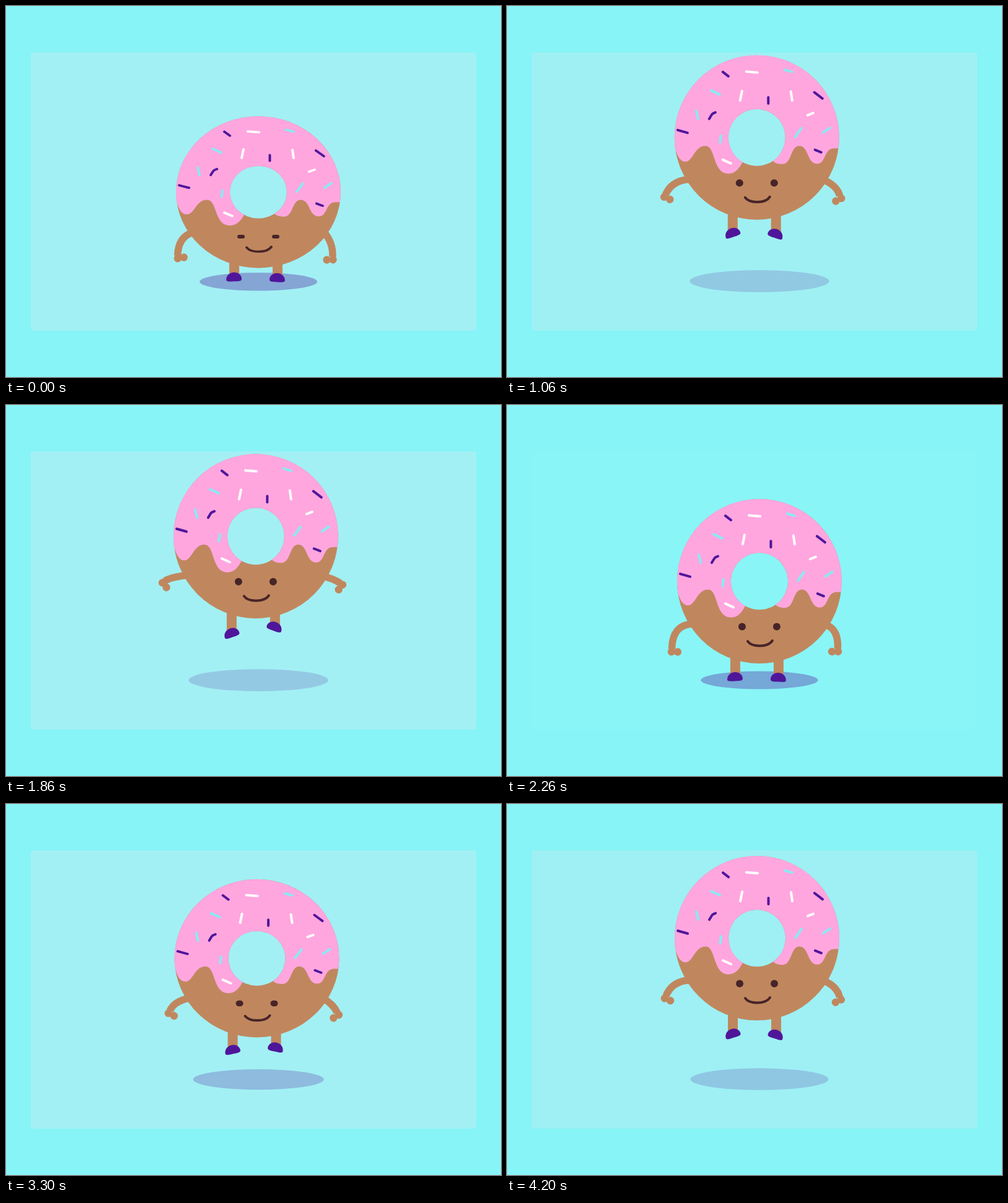
An HTML page for the animation above (4220 ms loop, 800 by 600 pixels).

```html
<!DOCTYPE html>
<html lang="en">
<head>
<meta charset="utf-8">
<title>Bouncing donut</title>
<style>
  html, body { margin: 0; width: 100%; height: 100%; overflow: hidden; background: #87f4f7; }
  svg { display: block; width: 800px; height: 600px; }
  .dough { fill: #c0875e; }
  .limb { fill: none; stroke: #c0875e; }
  .arm { stroke-width: 11.5; }
  .leg { stroke-width: 16; }
  .purple { fill: #50169a; }
  .face { fill: #472428; }
  .sprinkles { fill: none; stroke-width: 4; stroke-linecap: round; stroke-linejoin: round; }
</style>
</head>
<body>
<svg viewBox="0 0 800 600">
  <rect id="panel" x="40" y="75" width="720" height="450" rx="4" fill="#a2f0f4"/>
  <ellipse id="shadow" class="purple" cx="408"/>
  <g id="donut">
    <path id="legL" class="limb leg"/>
    <path id="legR" class="limb leg"/>
    <path id="shoeL" class="purple" d="M-12.5 4.5C-12.5-3-6-7.5.5-7.5S12.5-3 12.5 3C12.5 7 8 7 0 7C-8 7.5-12.5 7.5-12.5 4.5Z"/>
    <path id="shoeR" class="purple" d="M12.5 4.5C12.5-3 6-7.5-.5-7.5S-12.5-3-12.5 3C-12.5 7-8 7 0 7C8 7.5 12.5 7.5 12.5 4.5Z"/>
    <g id="armL" class="dough"><path class="limb arm"/><circle r="6.2"/><circle r="6.2"/></g>
    <g id="armR" class="dough"><path class="limb arm"/><circle r="6.2"/><circle r="6.2"/></g>
    <g id="body">
      <path class="dough" fill-rule="evenodd" d="M-133 0A133 133 0 1 1 133 0A133 133 0 1 1-133 0ZM-46 0A46 46 0 1 0 46 0A46 46 0 1 0-46 0Z"/>
      <path fill="#ffa6df" d="M-131.8 18C-128 32-123 39-115.5 39C-103 39-101 13.5-83 13.5C-66 13.5-72 58.5-46 58.5C-34 58.5-28 49-23 39.8A46 46 0 1 1 26 38C30 42 35 43 41 43C57 43 54 13.5 68.5 13.5C84 13.5 81 42.5 97.5 42.5C112 42.5 108 17.5 125 17.5H131.8A133 133 0 1 0-131.8 18Z"/>
      <g class="sprinkles">
        <path stroke="#50169a" d="M-55-106L-46-99M18.5-65V-55M93-73L106-63M-77-30Q-73-37-72-38T-67-40.5M-128-12L-112-7.5M94 20L104 24"/>
        <path stroke="#fff" d="M-17-106.5L1-105M-24-75L-27-60M55-74L57-60M82-36L91-39.5M-55 36L-42 42"/>
        <path stroke="#8aeaf2" d="M45-109.5L57-106M-74-76L-60-69.5M-98-43L-95-30M-58-3L-59.5 8M72-15L62-1M107-8L118-15.5"/>
      </g>
      <rect id="eyeL" class="face" x="-34" width="12"/>
      <rect id="eyeR" class="face" x="22" width="12"/>
      <path d="M-19 97C-12 107 14 107 21 96" fill="none" stroke="#472428" stroke-width="4" stroke-linecap="round"/>
    </g>
  </g>
</svg>
<script>
const LOOP = 4220, CYCLE = 1588, HALF = CYCLE / 2, START = 65, DROP = 76.5;
const el = id => document.getElementById(id);
const set = (node, attrs) => { for (const k in attrs) node.setAttribute(k, attrs[k]); };
const mix = (a, b, k) => a.map((v, i) => v + (b[i] - v) * k);
const smooth = x => { x = Math.min(1, Math.max(0, x)); return x * x * (3 - 2 * x); };

// Arm poses: shoulder y, then bend x, y and wrist x, y from the shoulder, hand angle
const armPoses = {
  armL: { side: 1, x: -108,
          low: [[66, -21.5, 7.5, -22, 37.5, -11], [69, -33, 1.5, -33.5, 41, 0]],
          high: [[63, -28, 2, -40, 8.5, 51], [67.5, -29, 1.5, -39.8, 24, 24]] },
  armR: { side: -1, x: 106,
          low: [[64.5, 15, 18, 13.5, 41, 0], [70, 22, 6.5, 20.5, 39.5, 0]],
          high: [[64, 19.5, 3.5, 31, 11, -53], [67.5, 24, 10, 28.4, 26.5, -28]] }
};

// Distance below the top of the jump, d ms away from it: free fall, then a soft landing
function fall(d) {
  const g = 0.00074, soft = 295;
  if (d <= soft) return g * d * d;
  const span = HALF / 2 - soft, x = (d - soft) / span, k = smooth(x);
  return g * soft * soft * (1 - k) + x * (1 - x) ** 2 * span * 2 * g * soft + DROP * k;
}

function drawArm(id, lift, low, high, dy) {
  const { side, x, low: lows, high: highs } = armPoses[id];
  const [sy, qx, qy, ex, ey, angle] = mix(lows[low], highs[high], lift);
  const y = sy + dy;
  const [arm, thumb, palm] = el(id).children;
  set(arm, { d: `M${x} ${y}q${qx} ${qy} ${ex} ${ey}` });
  const wrist = `translate(${x + ex} ${y + ey}) rotate(${angle})`;
  set(palm, { transform: wrist, cx: -0.5 * side, cy: 4.5 });
  set(thumb, { transform: wrist, cx: 9.5 * side, cy: 4.5 });
}

function drawLeg(side, x, y, angle) {
  set(el("leg" + side), { d: `M${x + 0.5} 100V${y}` });
  set(el("shoe" + side), { transform: `translate(${x} ${y}) rotate(${angle})` });
}

function draw(time) {
  const phase = (time + START) % CYCLE;
  const second = phase > HALF ? 1 : 0;
  const drop = fall(Math.abs(phase % HALF - HALF / 2));
  const lift = 1 - drop / DROP;
  const fromSquash = Math.min(phase, CYCLE - phase);
  const press = fromSquash < 360 ? (1 + Math.cos(Math.PI * fromSquash / 360)) / 2 : 0;
  const squash = 1 - 0.085 * press, sink = 18.6 * press;

  set(el("panel"), { opacity: smooth(Math.abs(phase - HALF) / (HALF / 2)) });
  set(el("shadow"), { cy: 445 + press, rx: 94.5 + 19 * lift, ry: 14.5 + 3.5 * lift, opacity: 0.35 - 0.18 * lift });
  set(el("donut"), { transform: `translate(${408 - 4.4 * lift} ${209.5 + drop})` });
  set(el("body"), { transform: `translate(0 ${sink}) scale(1 ${squash})` });

  const kick = second ? 0 : 1;
  drawLeg("L", -39.5, 154 + kick * 2.5 * Math.sqrt(lift), -18 * lift);
  drawLeg("R", 30.5, 155.5 - kick * 10 * lift * lift, 18 * lift);

  const low = phase > HALF / 2 && phase < HALF * 1.5 ? 1 : 0;
  drawArm("armL", lift, low, second, sink);
  drawArm("armR", lift, low, second, sink);

  const h = 12 - 6.2 * press ** 1.5, y = 73.5 + 4.9 * press - h / 2;
  for (const id of ["eyeL", "eyeR"]) set(el(id), { y, height: h, rx: h / 2 });
}

const begin = performance.now();
function tick() {
  draw((performance.now() - begin) % LOOP);
  requestAnimationFrame(tick);
}
tick();
</script>
</body>
</html>
```
